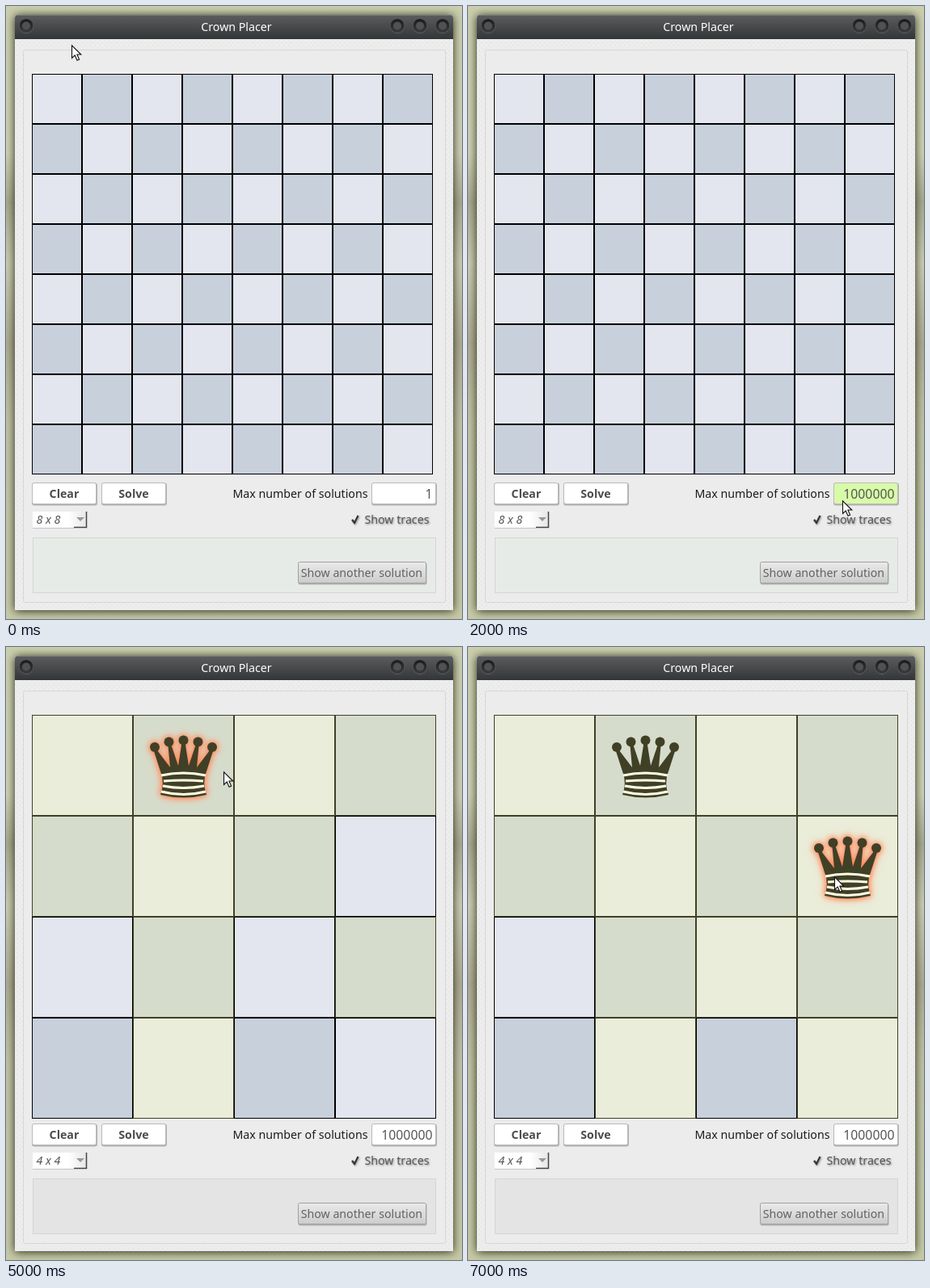
Write an HTML page that moves like this. It is 564 px wide and 759 px high and loops after 8 s.

```html
<!DOCTYPE html>
<html lang="en">
<head>
<meta charset="utf-8">
<title>Crown Placer</title>
<style>
html, body { margin: 0; width: 100%; height: 100%; overflow: hidden; background: #bfc3a2; }
svg { display: block; }
text { font: 14.2px "Noto Sans", sans-serif; fill: #555; }
.bold { font-weight: 700; fill: #4c4c4c; text-anchor: middle; }
.glow { filter: drop-shadow(0 0 3px #ff5a40) drop-shadow(0 0 4px #ff7860); }
.window { filter: drop-shadow(0 1px 6px #24281a); }
.soft { filter: drop-shadow(1px 1px 1px #0006); }
</style>
</head>
<body>
<svg width="564" height="759" viewBox="0 0 564 759">
  <defs>
    <linearGradient id="backdrop" x2="0" y2="1">
      <stop offset="0" stop-color="#cbcfad"/>
      <stop offset=".24" stop-color="#cfd1b4"/>
      <stop offset=".32" stop-color="#a9aa8e"/>
      <stop offset=".42" stop-color="#cccdb2"/>
      <stop offset=".55" stop-color="#aeac92"/>
      <stop offset=".68" stop-color="#c3c4a6"/>
      <stop offset="1" stop-color="#c6caa6"/>
    </linearGradient>
    <linearGradient id="bar" x2="0" y2="1">
      <stop offset="0" stop-color="#5c5d5f"/>
      <stop offset=".5" stop-color="#48494b"/>
      <stop offset="1" stop-color="#343537"/>
    </linearGradient>
    <linearGradient id="knob" x2="0" y2="1">
      <stop offset="0" stop-color="#1d1d1e"/>
      <stop offset="1" stop-color="#3a3a3c"/>
    </linearGradient>
    <linearGradient id="raised" x2="0" y2="1">
      <stop offset="0" stop-color="#eaeaea"/>
      <stop offset="1" stop-color="#cccccc"/>
    </linearGradient>
    <linearGradient id="fade">
      <stop offset=".65" stop-color="#fff"/>
      <stop offset="1" stop-color="#e6e6e6"/>
    </linearGradient>
    <pattern id="grain" width="6" height="6" patternUnits="userSpaceOnUse">
      <path fill="#ededed" d="M0 0h6v6H0z"/>
      <path fill="#e7e7e7" d="M1 0h2v2h-2zM4 3h2v2h-2z"/>
    </pattern>
    <g id="queen">
      <path fill="#000" d="M25 42 27 40 46 65 43 33H46L56 63 61 31H64L69 63 79 33H82L79 65 98 40 100 42 90 73Q87 82 89 92L91 99Q62.500 106 34 99L36 92Q38 82 35 73Z"/>
      <circle cx="27" cy="40" r="6"/>
      <circle cx="44.500" cy="33.500" r="6"/>
      <circle cx="62.500" cy="31.500" r="6"/>
      <circle cx="80.500" cy="33.500" r="6"/>
      <circle cx="98" cy="40" r="6"/>
      <path fill="none" stroke="#fff" stroke-width="3" d="M35 75Q62.500 69 90 75M38 82Q62.500 80 87 82M37 88Q62.500 93 88 88M35 95Q62.500 102 90 95"/>
    </g>
  </defs>

  <path fill="url(#backdrop)" d="M0 0h564v759H0z"/>
  <path class="window" fill="#eaeaea" d="M11 748V15q0-4 4-4H549q4 0 4 4V748z"/>
  <path fill="url(#grain)" d="M11 41H553V748H11z"/>
  <path fill="url(#bar)" d="M11 41V15q0-4 4-4H549q4 0 4 4V41z"/>
  <path stroke="#777879" d="M14 11.500H550"/>
  <g id="knobs"></g>
  <text x="285" y="31" text-anchor="middle" style="fill:#fff;font-weight:500">Crown Placer</text>
  <rect x="21.500" y="54.500" width="522" height="684" rx="2" fill="#ececec" stroke="#d6d6d6"/>

  <g id="board"></g>

  <g id="buttons"></g>
  <text class="bold" x="72" y="609">Clear</text>
  <text class="bold" x="158" y="609">Solve</text>
  <text x="280.500" y="609" style="fill:#1c1c1c">Max number of solutions</text>
  <text id="limit" x="527.500" y="609.500" text-anchor="end" style="font-size:15.800px"></text>

  <path id="combo" d="M33 626H100V646H33z"/>
  <path stroke="#c4c4c4" d="M33 646.500H84"/>
  <path fill="none" stroke="#444" stroke-width="1.500" d="M84 645.500H99.500V626"/>
  <path fill="#999" d="M87 633H97L92 638z"/>
  <text id="size" x="37.500" y="641" font-style="italic" style="font-style:italic"></text>

  <g class="soft">
    <path fill="none" stroke="#333" stroke-width="2.200" d="M428 636 431 640 435.500 631"/>
    <text x="443.500" y="641">Show traces</text>
  </g>

  <rect id="panel" x="33.500" y="658.500" width="498" height="68" stroke="#d3d6d3"/>
  <rect x="361.500" y="689.500" width="159" height="27" rx="2" fill="#b0b0b0"/>
  <rect x="361.500" y="688.500" width="158" height="26" rx="2" fill="url(#raised)" stroke="#a0a0a0"/>
  <text x="364.700" y="707" style="fill:#626262">Show another solution</text>

  <path id="cursor" fill="#fff" stroke="#111" stroke-width="1.100" d="M.5.800V16.500L4.200 13 7 19.300 9.600 18.200 6.900 12H11.800Z"/>
</svg>
<script>
const $ = id => document.getElementById(id);
const STEP = 1000;
const GREEN = '#d8fba8';

// One state per second; queens are [row, column], hot is the glowing queen's index.
const base = { n: 8, limit: '1', queens: [], hot: -1, hover: '' };
const states = [
  { cursor: [81, 48] },
  { cursor: [463, 612], hover: 'field' },
  { cursor: [463, 612], hover: 'field', limit: '1000000' },
  { cursor: [69, 639], hover: 'combo', limit: '1000000' },
  { cursor: [84, 637], hover: 'combo', limit: '1000000', n: 4 },
  { cursor: [269, 154], limit: '1000000', n: 4, queens: [[0, 1]], hot: 0 },
  { cursor: [453, 284], limit: '1000000', n: 4, queens: [[0, 1]] },
  { cursor: [453, 284], limit: '1000000', n: 4, queens: [[0, 1], [1, 3]], hot: 1 }
].map(s => ({ ...base, ...s }));

const box = (x, id) =>
  `<rect x="${x}" y="590.500" width="81" height="28" rx="3" fill="#b2b0b2"/>
   <rect id="${id}" x="${x + .5}" y="590.500" width="79" height="26" rx="2.500" fill="#fff" stroke="#bcbabc"/>`;

$('buttons').innerHTML = box(32, 'clear') + box(118, 'solve') + box(452, 'field');
$('knobs').innerHTML = [25, 484, 512, 540].map(x =>
  `<circle cx="${x}" cy="25" r="8.500" fill="none" stroke="#636466"/>
   <circle cx="${x}" cy="24.500" r="6.800" fill="#505153" stroke="url(#knob)" stroke-width="3.500"/>`).join('');

const attacks = ([r, c], row, col) =>
  r === row || c === col || Math.abs(r - row) === Math.abs(c - col);

function cell(s, row, col) {
  const side = s.n === 8 ? 62 : 125;
  const queen = s.queens.findIndex(([r, c]) => r === row && c === col);
  const fill = (row + col) % 2 ? '#c8d0dc' : '#e3e6ee';
  let out = `<g transform="translate(${32 + col * side} ${84 + row * side})">
    <rect x=".5" y=".5" width="${side - 1}" height="${side - 1}" fill="${fill}" stroke="#000"/>`;
  if (queen >= 0) out += `<use href="#queen" class="${queen === s.hot ? 'glow' : ''}"/>`;
  if (s.queens.some(q => attacks(q, row, col)))
    out += `<rect width="${side}" height="${side}" fill="#ffff96" opacity=".25"/>`;
  return out + '</g>';
}

function show(s) {
  let cells = '';
  for (let i = 0; i < s.n * s.n; i++) cells += cell(s, Math.floor(i / s.n), i % s.n);
  $('board').innerHTML = cells;
  $('limit').textContent = s.limit;
  $('size').textContent = `${s.n} x ${s.n}`;
  $('field').setAttribute('fill', s.hover === 'field' ? GREEN : '#fff');
  $('combo').setAttribute('fill', s.hover === 'combo' ? GREEN : 'url(#fade)');
  $('panel').setAttribute('fill', s.queens.length ? '#e4e4e4' : '#e7ebe7');
  $('cursor').setAttribute('transform', `translate(${s.cursor})`);
}

let current = -1;
function tick() {
  const index = Math.floor(performance.now() / STEP) % states.length;
  if (index !== current) show(states[current = index]);
  requestAnimationFrame(tick);
}
tick();
</script>
</body>
</html>
```
